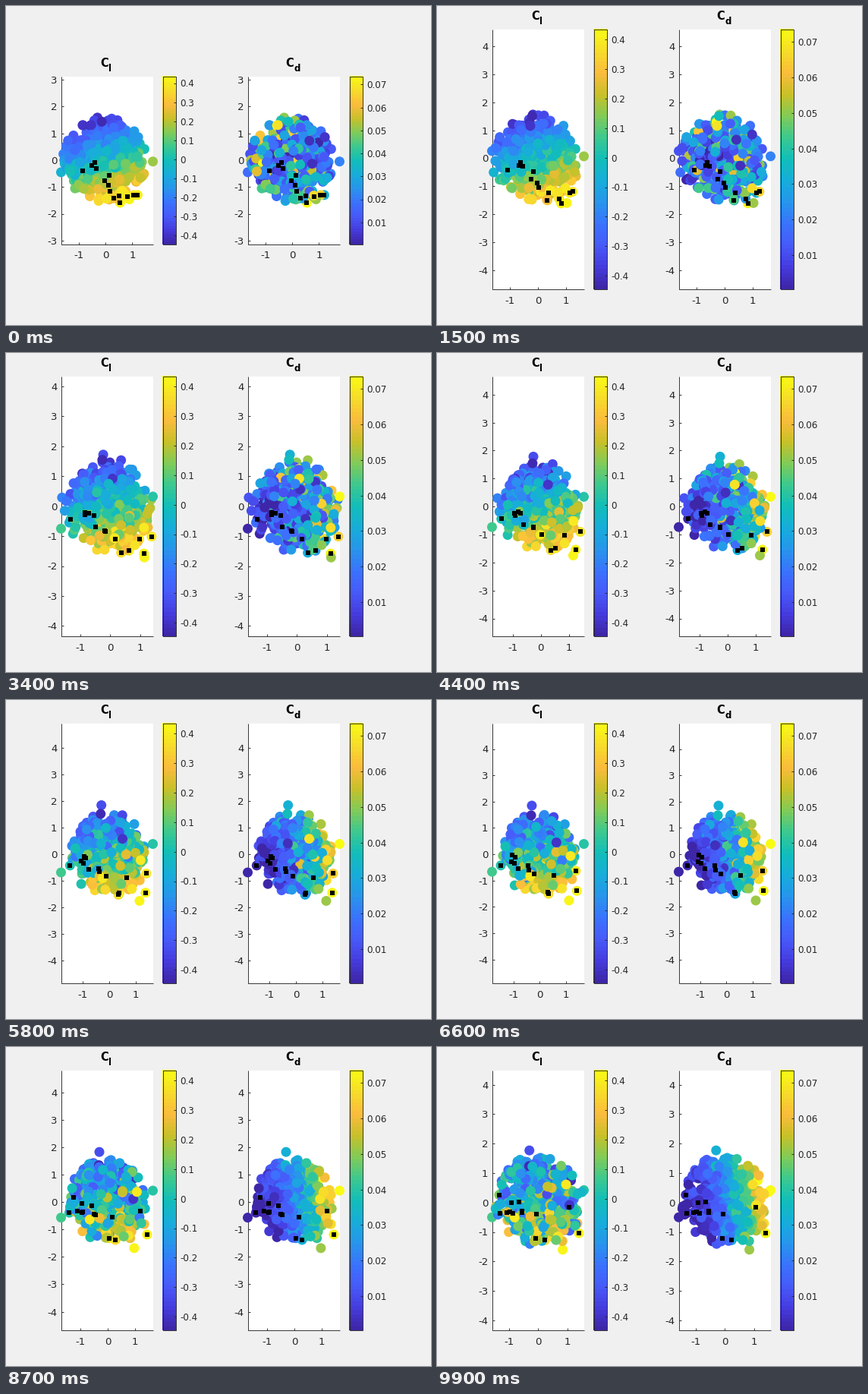
A matplotlib script for the animation above (10000 ms loop, 560 px wide and 420 px high).

```python
import numpy as np
import matplotlib.pyplot as plt
from matplotlib.animation import FuncAnimation
from matplotlib.colors import LinearSegmentedColormap

W, H, DPI = 560, 420, 100
FRAMES, INTERVAL = 100, 100
INK, BACK = "#262626", "#f0f0f0"
PANEL_W = 121
PHI = np.array([1.47, 1.03])  # angles between the start and end projections

PARULA = LinearSegmentedColormap.from_list("parula", (
    "#3e26a8 #463de0 #475bf9 #3a74fe #2796eb #17aeda #12beb9 "
    "#3dc990 #81cc59 #c8c129 #fbbc3d #f7db2b #f9fb15").split(), N=64)

# Key points: start x, start y, end x, end y
SQUARES = np.array([
    (-.84, -.40, -1.30, -.36), (-.52, -.20, -.86, -.36),
    (-.41, -.09, -1.07, -.34), (-.35, -.31, -.91, 0),
    (-.04, -.77, -.96, -.31), (.13, -.57, -1.33, .26),
    (.10, -.93, -.55, -.34), (.18, -1.16, -.65, .03),
    (.30, -1.42, .23, -1.28), (.52, -1.33, -.55, -.29),
    (.55, -1.59, 1.38, -1.04), (.81, -1.36, -.10, -1.22),
    (1.20, -1.30, -.05, -.39), (1.06, -1.30, 1.04, -.16)])

# Outermost dots, which set the axis limits
RIM = np.array([
    (1.77, -.05, -.20, .64), (.81, .21, 1.55, .42),
    (-1.07, -.75, -1.57, -.50), (-1.66, -.45, 0, -.54),
    (-1.57, .23, -.65, .30), (-.11, 1.38, -.30, 1.77),
    (-.30, 1.59, .48, .75), (.89, -1.46, .83, -1.60)])


def project(pts, u):
    a, b = pts[:, :2], pts[:, 2:]
    return (a * np.sin((1 - u) * PHI) + b * np.sin(u * PHI)) / np.sin(PHI)


def make_cloud(rng, count):
    """Random tracks that stay inside the rim all the way."""
    a = rng.normal(0, .8, (6000, 2))
    b = np.cos(PHI) * a + np.sin(PHI) * rng.normal(0, .8, (6000, 2))
    pts = np.hstack([a, b])
    keep = np.ones(len(pts), bool)
    for u in np.linspace(0, 1, 21):
        x, y = project(pts, u).T
        rim = project(RIM, u)[:, 0]
        keep &= np.hypot(x, y) < 1.58
        keep &= (x > rim.min() + .03) & (x < rim.max() - .03)
    return pts[keep][:count]


rng = np.random.default_rng(8)
dots = np.vstack([SQUARES, RIM, make_cloud(rng, 540)])
noise = rng.normal(0, 1, (2, len(dots)))
noise[:, :len(SQUARES) + len(RIM)] = 0
x0, y0, x1, y1 = dots.T
lift = .09 * x0 - .23 * y0 + .04 * noise[0]
drag = .020 + .024 * x1 + .006 * x1**2 + .005 * y1 + .09 * lift**2
drag = np.maximum(drag + .003 * noise[1], .001)

# axes left, subscript, values, colour limits, colour ticks, decimals
PANELS = [
    (72.5, "l", lift, (-.445, .436), np.arange(-4, 5) / 10, 1),
    (318.5, "d", drag, (.0005, .0736), np.arange(1, 8) / 100, 2)]

fig = plt.figure(figsize=(W / DPI, H / DPI), dpi=DPI, facecolor=BACK)
ax = fig.add_axes([0, 0, 1, 1])


def size(px):
    return px * 72 / DPI


def line(xs, ys):
    ax.plot(xs, ys, color=INK, lw=size(.9), solid_capstyle="butt", zorder=2)


def label(x, y, text, px, ha="left", **kw):
    ax.text(x, y, text, fontsize=size(px), ha=ha, va="baseline",
            family="DejaVu Sans", **{"color": INK, **kw})


def draw_bar(left, top, bottom, lims, ticks, digits):
    right = left + 17
    ax.imshow(np.linspace(0, 1, 64)[:, None], cmap=PARULA, aspect="auto",
              extent=(left - .5, right + .5, bottom + .5, top - .5),
              origin="lower", interpolation="nearest", zorder=1)
    line([left, right, right, left, left], [top, top, bottom, bottom, top])
    for v in ticks:
        y = bottom - (v - lims[0]) / (lims[1] - lims[0]) * (bottom - top)
        line([right - 3, right], [y, y])
        label(right + 5.5, y + 4.9, f"{v:.{digits}f}" if v else "0", 12)


def draw_panel(panel, top, bottom, pos, marks):
    left, sub, values, lims, ticks, digits = panel
    right = left + PANEL_W
    lo, hi = pos.min(axis=0), pos.max(axis=0)
    scale = PANEL_W / (hi[0] - lo[0])

    def to_px(x, y):
        return (left + (x - lo[0]) * scale,
                (top + bottom) / 2 - (y - (lo[1] + hi[1]) / 2) * scale)

    ax.fill([left, right, right, left], [top, top, bottom, bottom],
            color="white", lw=0, zorder=0)
    line([left, left, right], [top, bottom, bottom])
    for k in range(-5, 6):
        x, y = to_px(k, k)
        if left < x < right:
            line([x, x], [bottom - 3, bottom])
            label(x, bottom + 19, str(k), 13.33, "center")
        if top < y < bottom:
            line([left, left + 3], [y, y])
            label(left - 5, y + 4.9, str(k), 13.33, "right")

    ax.scatter(*to_px(*pos.T), c=values, cmap=PARULA, vmin=lims[0],
               vmax=lims[1], s=size(13)**2, lw=0, zorder=3)
    ax.scatter(*to_px(*marks.T), c="black", marker="s", s=size(6.6)**2,
               lw=0, zorder=4)

    x = left + (51.3 if sub == "l" else 50)
    label(x, top - 12.8, "C", 14.67, weight="bold", color="black")
    label(x + 11.3, top - 6, sub, 11.73, weight="bold", color="black")
    draw_bar(left + 134, top, bottom, lims, ticks, digits)


def draw(i):
    ax.clear()
    u = i / (FRAMES - 1)
    top, bottom = (92.5, 313.5) if i == 0 else (30.5, 372.5)
    pos, marks = project(dots, u), project(SQUARES, u)
    for panel in PANELS:
        draw_panel(panel, top, bottom, pos, marks)
    ax.set_xlim(0, W)
    ax.set_ylim(H, 0)
    ax.axis("off")
    return []


anim = FuncAnimation(fig, draw, frames=FRAMES, interval=INTERVAL,
                     init_func=lambda: [], repeat=True, repeat_delay=0)
plt.show()
```
